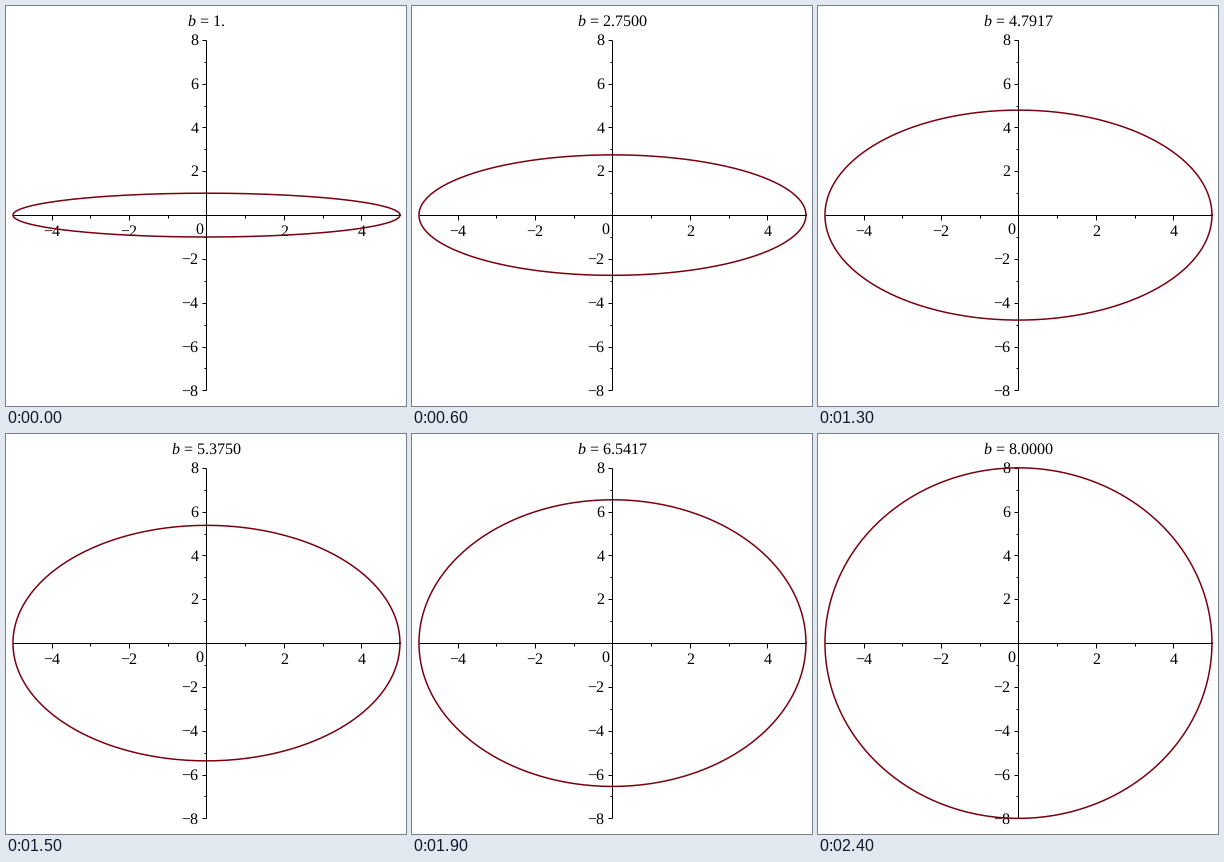
Animation of 400 by 400 pixels, one loop 2500 ms. Source, as a matplotlib script:

```python
import numpy as np
import matplotlib.pyplot as plt
from matplotlib.animation import FuncAnimation

SIZE, DPI = 400, 100
FRAMES, INTERVAL = 25, 100
PX = 72 / DPI                   # points per pixel
CX, CY = 200.45, 209.1          # origin of the plot
SX, SY = 38.7, 21.91            # pixels per unit
A, B_MIN, B_MAX = 5, 1, 8

plt.rcParams["font.family"] = "Liberation Serif"
plt.rcParams["font.size"] = 16 * PX
plt.rcParams["text.hinting"] = "none"

fig = plt.figure(figsize=(SIZE / DPI, SIZE / DPI), dpi=DPI, facecolor="white")
ax = fig.add_axes([0, 0, 1, 1])
ax.set_xlim(0, SIZE)
ax.set_ylim(SIZE, 0)
ax.axis("off")


def line(x0, y0, x1, y1):
    ax.plot([x0, x1], [y0, y1], color="black", lw=PX, snap=True,
            solid_capstyle="butt")


def label(x, y, text, ha="center", **style):
    return ax.text(x, y, text, ha=ha, va="baseline", color="black", **style)


def number(n):
    return str(n).replace("-", "\u2212")


def draw_axes():
    line(CX - A * SX, CY, CX + A * SX, CY)
    line(CX, CY - 8 * SY, CX, CY + 8 * SY)
    for n in range(-4, 5):
        if n:
            x = CX + n * SX
            line(x, CY, x, CY + (2.5 if n % 2 else 4.5))
            if n % 2 == 0:
                label(x, 230, number(n))
    for n in range(-8, 9):
        if n:
            y = CY - n * SY
            line(CX - (2.5 if n % 2 else 4.5), y, CX, y)
            if n % 2 == 0:
                label(192.4, y + 5.2, number(n), ha="right")
    label(193.5, 228, "0")


draw_axes()
theta = np.linspace(0, 2 * np.pi, 361)
curve, = ax.plot([], [], color="#78000e", lw=1.5 * PX, zorder=4)
name = label(0, 20, "b", ha="left", style="italic")
value = label(0, 20, "", ha="left")


def update(i):
    b = B_MIN + (B_MAX - B_MIN) * i / (FRAMES - 1)
    curve.set_data(CX + A * SX * np.cos(theta), CY - b * SY * np.sin(theta))
    digits = f"{b:.4f}" if i else "1."
    left = CX - (29 + 8 * (len(digits) - 1)) / 2
    name.set_x(left - 0.7)
    value.set_x(left + 12)
    value.set_text("= " + digits)
    return curve, name, value


anim = FuncAnimation(fig, update, frames=FRAMES, interval=INTERVAL,
                     repeat=True, repeat_delay=0, blit=False)
plt.show()
```
